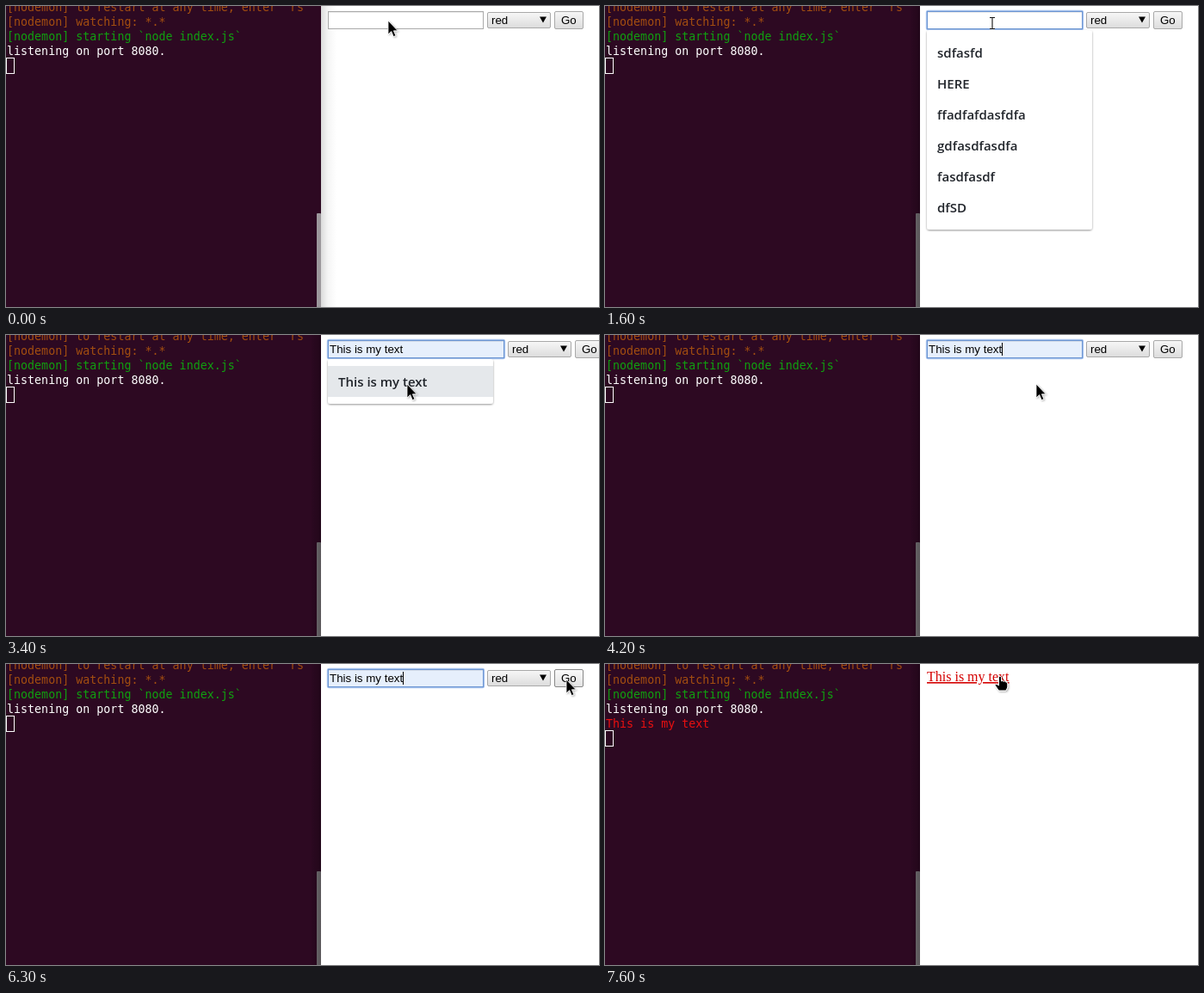
These frames come from a looping animation (689x350 px, 8 s). An HTML page:

```html
<!DOCTYPE html>
<html lang="en">
<head>
<meta charset="utf-8">
<title>Terminal and form</title>
<style>
html, body { margin: 0; width: 100%; height: 100%; overflow: hidden; background: #fff; }
svg { display: block; width: 689px; height: 350px; }
text { white-space: pre; }
.mono { font: 13.33px "DejaVu Sans Mono", monospace; }
.ui { font: 13.33px "Liberation Sans", Arial, sans-serif; }
.menu { font: 600 15px "Open Sans", "Noto Sans", sans-serif; fill: #20242a; }
.link { font: 16px "Liberation Serif", Times, serif; fill: #d40000; text-decoration: underline; }
</style>
</head>
<body>
<svg viewBox="0 0 689 350">
  <defs>
    <linearGradient id="button" x2="0" y2="1">
      <stop stop-color="#f7f7f7"/><stop offset="1" stop-color="#dcdcdc"/>
    </linearGradient>
    <linearGradient id="hoverButton" x2="0" y2="1">
      <stop stop-color="#fafafa"/><stop offset="1" stop-color="#e2e2e2"/>
    </linearGradient>
    <linearGradient id="pageShade">
      <stop stop-color="#000" stop-opacity=".14"/>
      <stop offset=".45" stop-color="#000" stop-opacity=".04"/>
      <stop offset="1" stop-color="#000" stop-opacity="0"/>
    </linearGradient>
    <linearGradient id="termShade">
      <stop stop-color="#000" stop-opacity="0"/><stop offset="1" stop-color="#000" stop-opacity=".25"/>
    </linearGradient>
    <filter id="soft" x="-10%" y="-10%" width="120%" height="125%">
      <feDropShadow dx="0" dy="1" stdDeviation="1.3" flood-opacity=".42"/>
    </filter>
    <filter id="cursorShade" x="-50%" y="-50%" width="200%" height="200%">
      <feDropShadow dx="1" dy="1" stdDeviation=".8" flood-opacity=".35"/>
    </filter>
  </defs>

  <rect width="689" height="350" fill="#fff"/>
  <rect width="366" height="350" fill="#2d0922"/>
  <g class="mono">
    <text x="1" y="6" fill="#a34e10">[nodemon] to restart at any time, enter `rs`</text>
    <text x="1" y="23" fill="#a34e10">[nodemon] watching: *.*</text>
    <text x="1" y="40" fill="#10a010">[nodemon] starting `node index.js`</text>
    <text x="1" y="57" fill="#fff">listening on port 8080.</text>
    <text id="output" x="1" y="74" fill="#ea1010">This is my text</text>
  </g>
  <rect id="block" x=".5" width="9" height="18" fill="none" stroke="#fff"/>
  <rect id="scrollbar" x="361" y="241" width="5" height="112" rx="1"/>
  <rect id="pageShade_" x="366" width="18" height="350" fill="url(#pageShade)"/>
  <rect id="termShade_" x="353" width="13" height="350" fill="url(#termShade)"/>

  <g id="form" class="ui">
    <rect id="ring" x="373.5" y="5.5" height="22" rx="2" fill="none" stroke="#a3c0ec" stroke-width="1.4"/>
    <rect id="input" x="374.5" y="6.5" height="20"/>
    <path id="inset" stroke="#000" stroke-opacity=".07"/>
    <text id="typed" x="376" y="21"></text>
    <rect id="caret" y="9" width="1" height="15"/>
    <g id="controls">
      <rect x="559.5" y="7.5" width="73" height="18" rx="1.5" fill="url(#button)" stroke="#a9a9a9"/>
      <text x="564" y="21">red</text>
      <path d="M620 12.5h8l-4 7z"/>
      <rect id="go" x="637.5" y="6.5" width="33" height="20" rx="1.5"/>
      <text x="645" y="21">Go</text>
    </g>
  </g>
  <text id="link" class="link" x="374" y="20">This is my text</text>

  <g id="menu" class="menu">
    <rect id="panel" x="374" y="28" width="192" rx="3" fill="#fff" filter="url(#soft)"/>
    <rect id="row" x="374" y="36" width="192" height="36" fill="#e5e8eb"/>
    <g id="items"></g>
  </g>

  <g id="arrow" filter="url(#cursorShade)">
    <path d="M0 0V16L3.7 12.6 6.2 18.6 8.9 17.5 6.4 11.8H11.2Z" fill="#000" stroke="#fff" stroke-width=".8"/>
  </g>
  <g id="beam" fill="none">
    <path d="M-3-6.5H-.6L0-6 .6-6.5H3M0-6V6M-3 6.5H-.6L0 6 .6 6.5H3" stroke="#fff" stroke-opacity=".7" stroke-width="2.4"/>
    <path d="M-3-6.5H-.6L0-6 .6-6.5H3M0-6V6M-3 6.5H-.6L0 6 .6 6.5H3" stroke="#111" stroke-width="1.1"/>
  </g>
  <g id="hand" filter="url(#cursorShade)">
    <path d="M-1.5 1Q0-1 1.5 1V6Q3 4.6 4 6.3 5.6 5 6.6 7 8.7 6.5 8.8 9V13L7 17H-1.5L-5.8 10.8Q-5.5 8.6-3.2 9.7L-1.5 11Z" fill="#000" stroke="#fff" stroke-width="1"/>
  </g>
</svg>
<script>
const LOOP = 8000;
const PHRASE = 'This is my text';
const HISTORY = ['sdfasfd', 'HERE', 'ffadfafdasfdfa', 'gdfasdfasdfa', 'fasdfasdf', 'dfSD'];
const el = Object.fromEntries([...document.querySelectorAll('[id]')].map(e => [e.id, e]));

// Each track is a list of [time, value] holds.
const typing = [[0, ''], [1700, 't'], [1900, 'th'], [2000, 'thi'], [2100, 'this'], [2300, 'this '], [3300, PHRASE]];
const caretOn = [[0, 0], [1500, 1], [1600, 0], [1700, 1], [2800, 0], [3900, 1], [4500, 0],
  [5500, 1], [5700, 0], [6300, 1], [6400, 0]];
const menuAlpha = [[0, 0], [800, 1], [3900, .5], [4000, .15], [4200, 0]];
const pointer = [
  [0, ['arrow', 444, 17]], [500, ['beam', 445.5, 18]], [1300, ['beam', 450, 20]],
  [3300, ['arrow', 462, 52]], [3400, ['arrow', 466, 57]],
  [4200, ['arrow', 501, 57]], [4300, ['arrow', 665, 57]], [4500, ['arrow', 664, 55]],
  [4700, ['arrow', 674, 72]], [4800, ['arrow', 671, 56]], [4900, ['arrow', 658, 30]], [5000, ['arrow', 651, 18]],
  [7000, ['arrow', 485, 14]], [7300, ['arrow', 478, 9]], [7400, ['hand', 467, 6]],
  [7500, ['hand', 461, 11]], [7600, ['hand', 459, 14]]
];

const hold = (track, t) => track.findLast(([start]) => t >= start)[1];
const during = (t, from, to) => t >= from && t < to;
const show = (node, visible) => node.setAttribute('display', visible ? 'inline' : 'none');
function set(node, attrs) {
  for (const key in attrs) node.setAttribute(key, attrs[key]);
}

let listed = null;
function fillMenu(items) {
  if (items === listed) return;
  listed = items;
  el.items.innerHTML = items.map((s, i) => `<text x="386" y="${60 + 36 * i}">${s}</text>`).join('');
  set(el.panel, { height: 16 + 36 * items.length });
}
const MATCHES = [PHRASE];

function drawTerminal(t) {
  const printed = t >= 6500;
  const raised = t < 700;
  show(el.output, printed);
  set(el.block, { y: printed ? 77.5 : 60.5 });
  set(el.scrollbar, { fill: raised ? '#9c989c' : '#777377' });
  show(el.pageShade_, raised);
  show(el.termShade_, !raised);
}

function drawForm(t) {
  const preview = during(t, 3300, 3900);
  const focused = during(t, 700, 6400);
  const filled = t >= 3300;
  const extra = preview ? 24 : 0;
  const hover = during(t, 4900, 6900);
  show(el.form, t < 6900);
  show(el.link, t >= 6900);
  show(el.ring, focused);
  set(el.ring, { width: 182 + extra });
  set(el.input, {
    width: 180 + extra,
    fill: filled ? '#e6effc' : '#fff',
    stroke: focused ? '#6d96d2' : '#a9a9a9'
  });
  set(el.inset, { d: `M375 7.5h${179 + extra}` });
  const text = hold(typing, t);
  if (el.typed.textContent !== text) el.typed.textContent = text;
  show(el.caret, hold(caretOn, t));
  const width = text ? el.typed.getComputedTextLength() : 0;
  set(el.caret, { x: Math.round(376 + width) });
  set(el.controls, { transform: `translate(${extra})` });
  set(el.go, {
    fill: hover ? 'url(#hoverButton)' : 'url(#button)',
    stroke: hover ? '#888' : '#a9a9a9'
  });
}

function drawMenu(t) {
  const alpha = hold(menuAlpha, t);
  show(el.menu, alpha);
  set(el.menu, { opacity: alpha });
  fillMenu(t < 1800 ? HISTORY : MATCHES);
  show(el.row, t >= 3300);
}

function drawPointer(t) {
  const [shape, x, y] = hold(pointer, t);
  for (const name of ['arrow', 'beam', 'hand']) show(el[name], name === shape);
  set(el[shape], { transform: `translate(${x} ${y})` });
}

function draw() {
  const t = performance.now() % LOOP;
  drawTerminal(t);
  drawForm(t);
  drawMenu(t);
  drawPointer(t);
  requestAnimationFrame(draw);
}
draw();
</script>
</body>
</html>
```
